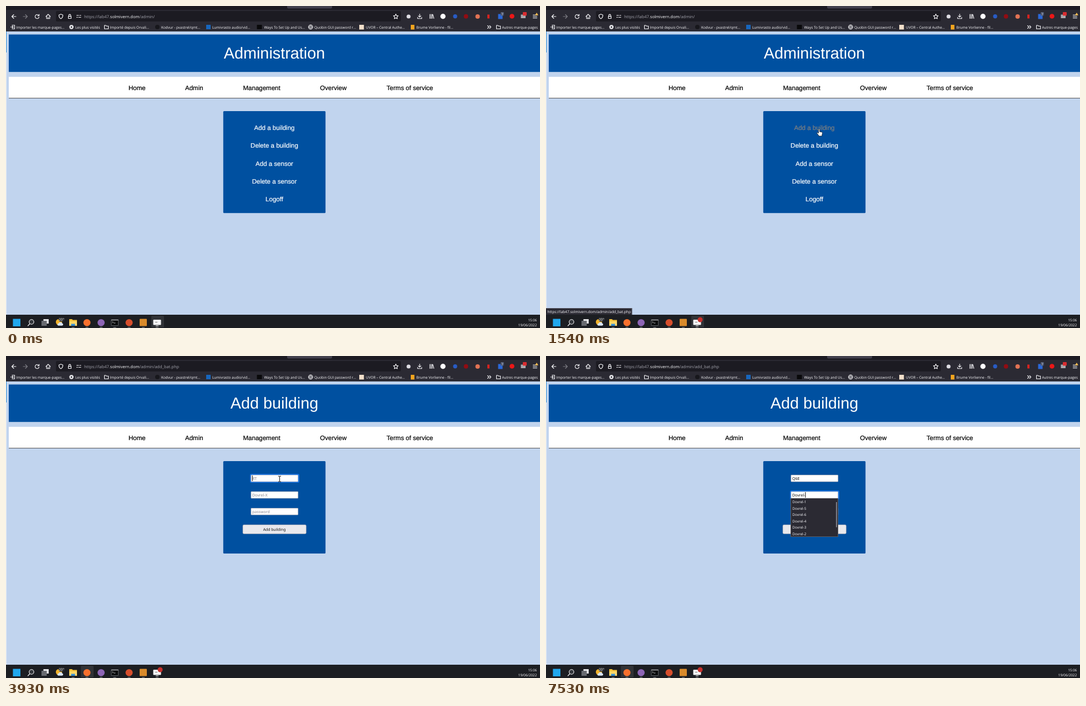
Recreate the animation shown at these times as an HTML page. Size 963 by 582 pixels, loop 8000 ms.

```html
<!DOCTYPE html>
<html lang="en">
<head>
<meta charset="utf-8">
<title>Add building</title>
<style>
html, body { margin: 0; width: 100%; height: 100%; overflow: hidden; background: #c1d4ee; }
svg { display: block; }
text { white-space: pre; text-rendering: geometricPrecision; }
.ui { font-family: "Open Sans", "Noto Sans", sans-serif; font-size: 6.45px; fill: #fbfbfe; }
.page { font-family: "Liberation Sans", Arial, sans-serif; font-size: 11.52px; stroke-width: .2; }
.field { font-family: "Noto Sans", sans-serif; font-size: 7px; fill: #111; }
.mid { text-anchor: middle; }
.line { fill: none; stroke: #fbfbfe; stroke-width: 1.1; stroke-linecap: round; stroke-linejoin: round; }
.dim { opacity: .4; }
.url { font-size: 7.5px; fill: #a3a3ac; }
.hint { fill: #868690; }
</style>
</head>
<body>
<svg width="963" height="582" viewBox="0 0 963 582">
  <!-- browser chrome -->
  <rect width="963" height="46" fill="#2b2a33"/>
  <rect width="963" height="7" fill="#1c1b22"/>
  <rect x="507" y="-4" width="81" height="8.5" rx="2" fill="#42414d"/>
  <rect x="90" y="9" width="622" height="19" rx="2.5" fill="#1c1b22"/>
  <g class="line">
    <path d="M18 19H10.5M14 15.5L10.5 19L14 22.5"/>
    <path class="dim" d="M31 19H38.5M35 15.5L38.5 19L35 22.5"/>
    <path id="reload" d="M59 17A3.6 3.6 0 1 0 59.6 20M59.7 15V17.6H57"/>
    <path id="stop" d="M53 16L59 22M59 16L53 22"/>
    <path d="M72 19L76 15L80 19M73.2 18.5V22.7H78.8V18.5M76 22.5V20"/>
    <path d="M99 14.8L102.6 16.2Q102.6 21 99 23Q95.4 21 95.4 16.2Z"/>
    <path d="M112.5 18.6H117.5V22.5H112.5ZM113.3 18.5V16.8A1.7 1.7 0 0 1 116.7 16.8V18.5"/>
    <path d="M127.5 17H131M133 17H135M127.5 20.5H129M131 20.5H135"/>
    <path d="M703 14.6L704.3 17.4L707.4 17.7L705.1 19.8L705.7 22.9L703 21.4L700.3 22.9L700.9 19.8L698.6 17.7L701.7 17.4Z"/>
    <path d="M746 14.5V20M743.7 17.8L746 20.1L748.3 17.8M742.3 20.6V22.7H749.7V20.6"/>
    <path d="M764.4 15V22.5M766.6 15V22.5M768.7 15V22.5M769.6 15.4L771.6 22.5"/>
    <path d="M950.5 16.3H957.5M950.5 19H957.5M950.5 21.7H957.5"/>
    <path d="M11 35V34.8H15.6V41.2H11V41M8.5 38H13M11.5 36.3L13.2 38L11.5 39.7"/>
    <path d="M177.5 35H180L181 36.2H184.7V41.3H177.5ZM884.5 35H887L888 36.2H891.7V41.3H884.5Z"/>
    <path d="M868.5 35.5L871 38L868.5 40.5M872 35.5L874.5 38L872 40.5"/>
    <circle cx="549.3" cy="38" r="3.8"/>
    <path d="M545.5 38H553M549.3 34.2Q545.8 38 549.3 41.8Q552.8 38 549.3 34.2" stroke-width=".8"/>
    <circle cx="118" cy="38" r="2.4" stroke-width="1.7"/>
    <circle cx="118" cy="38" r="3.7" stroke-width="1" stroke-dasharray=".9 2"/>
  </g>
  <circle cx="726" cy="19" r="3.6" fill="#dedee4"/>
  <circle cx="788" cy="18.7" r="4.7" fill="#fff"/>
  <circle cx="810" cy="18.7" r="3.7" fill="#285bc4"/>
  <circle cx="829.5" cy="18.7" r="4" fill="#900d13"/>
  <circle cx="850.5" cy="19" r="4" fill="#e17354"/>
  <rect x="868" y="15.5" width="4" height="7" fill="#d52220"/>
  <rect x="887.5" y="14.5" width="8" height="9" fill="#2b68d8"/>
  <rect x="892" y="11" width="6" height="6.5" rx="1" fill="#49536a"/>
  <text class="ui mid" x="895" y="16.5" style="font-size:6px">7</text>
  <circle cx="912.5" cy="18.5" r="4.3" fill="#ec1717"/>
  <rect x="928.5" y="15.5" width="8.5" height="6.5" fill="#a9a9ae"/>
  <rect x="932" y="11" width="7" height="6.5" rx="1" fill="#d92d30"/>
  <path d="M957 12L960 16.8H954Z" fill="#ffbd4f"/>
  <text class="ui url" x="141" y="21.7">https://lab47.<tspan fill="#fbfbfe">solmivern.dom</tspan>/admin/<tspan id="leaf"></tspan></text>

  <circle cx="273" cy="38" r="4" fill="#17171c"/>
  <rect x="361" y="34" width="8" height="8" fill="#1766bd"/>
  <rect x="452.5" y="34" width="9" height="8" fill="#09090b"/>
  <rect x="637" y="34" width="8.5" height="8.5" fill="#f2dfca"/>
  <rect x="730" y="34" width="6.5" height="8.5" fill="#f3a51f"/>
  <g class="ui">
    <text x="18.5" y="40.5">Importer les marque-pages...</text>
    <text x="125" y="40.5">Les plus visités</text>
    <text x="187.5" y="40.5">Importé depuis Orvali...</text>
    <text x="280" y="40.5">Kodvur - pvastrel/qmt...</text>
    <text x="372" y="40.5">Lumivrasto audio/vid...</text>
    <text x="465.5" y="40.5">Ways To Set Up and Us...</text>
    <text x="556" y="40.5">Quobin GUI password r...</text>
    <text x="649" y="40.5">UVOR – Central Authe...</text>
    <text x="740" y="40.5">Brume Vorlienne - fil...</text>
    <text x="894.5" y="40.5">Autres marque-pages</text>
  </g>

  <!-- web page -->
  <rect y="46" width="1" height="512" fill="#e4ebf5"/>
  <rect y="46" width="1" height="38" fill="#2f8fda"/>
  <rect x="5" y="51.5" width="958" height="67.7" fill="#0050a0"/>
  <rect x="5" y="128" width="958" height="38" fill="#fff"/>
  <rect x="5" y="166" width="958" height="1" fill="#555"/>
  <text id="title" class="page mid" x="484" y="95" fill="#fff" style="font-size:28.8px"></text>
  <g class="page" stroke="#000">
    <text x="221" y="152">Home</text>
    <text x="323" y="152">Admin</text>
    <text x="427.5" y="152">Management</text>
    <text x="566.3" y="152">Overview</text>
    <text x="686.3" y="152">Terms of service</text>
  </g>
  <rect id="panel" x="391.8" y="190" width="184.4" rx="1.5" fill="#0050a0"/>
  <g id="menu" class="page mid"></g>
  <g id="form">
    <rect id="glow" x="441" width="87" height="14" rx="1.5" fill="none" stroke="#1273e6" stroke-width="2"/>
    <g fill="#fff" stroke="#8f8f9d" stroke-width=".6">
      <rect x="441.8" y="215" width="85" height="12.2" rx=".8"/>
      <rect x="441.8" y="245" width="85" height="12.2" rx=".8"/>
      <rect x="441.8" y="275" width="85" height="12.2" rx=".8"/>
      <rect x="427" y="305" width="114.4" height="16.4" rx="2" fill="#e9e9ed"/>
    </g>
    <text id="name" class="field" x="444" y="223.8"></text>
    <text id="owner" class="field" x="444" y="253.8"></text>
    <text class="field hint" x="444" y="283.8">password</text>
    <text class="field mid" x="484" y="315.8" style="font-size:6.8px">Add building</text>
    <rect id="caret" width="1" height="10" fill="#111"/>
    <g id="nameList">
      <rect x="441.5" y="227.5" width="85" height="12" fill="#25252b" stroke="#59595c"/>
      <text class="ui" x="444.3" y="235.8">Q6E</text>
    </g>
    <g id="ownerList">
      <rect x="441.5" y="257.5" width="85" height="69" fill="#2b2a33" stroke="#5c5b60"/>
      <rect x="523" y="264" width="1.6" height="45.5" fill="#92929a"/>
    </g>
  </g>
  <g id="status">
    <rect id="statusBox" x="-.5" y="546.5" height="12" fill="#2b2a33" stroke="#55545e"/>
    <text id="statusText" class="ui" x="2.5" y="555.3" style="font-size:6.6px"></text>
  </g>

  <!-- taskbar -->
  <rect y="558" width="963" height="24" fill="#1c1e22"/>
  <rect id="active" y="560" width="23" height="21" rx="1.5" fill="#303236"/>
  <rect x="12.5" y="565.5" width="13.5" height="13.5" fill="#20a8ee"/>
  <g class="line" stroke-width="1.4">
    <circle cx="46" cy="571" r="4.2" fill="#33363a"/>
    <path d="M42.8 574.5L39.5 578"/>
  </g>
  <rect x="67.5" y="566" width="9.5" height="8" fill="#e7e7e9"/>
  <rect x="64" y="569" width="9.5" height="9" fill="#696b70"/>
  <circle cx="95.5" cy="571.3" r="5.6" fill="#f5b52e"/>
  <path d="M94 577.7A2.3 2.3 0 0 1 95 573.4A3.5 3.5 0 0 1 101.4 573.6A2.1 2.1 0 0 1 101.5 577.7Z" fill="#d9e5f5"/>
  <rect x="95" y="563" width="11" height="7.5" rx="3.7" fill="#292b2e"/>
  <text class="ui mid" x="100" y="569.3">20°</text>
  <path d="M114 566H119L120.5 567.5H128V578H114Z" fill="#f8c33c"/>
  <path d="M114 570H128V578H114Z" fill="#fbd768"/>
  <rect x="117.5" y="574.5" width="7" height="3.5" fill="#338ed8"/>
  <circle cx="146" cy="572.3" r="6.4" fill="#f9702c"/>
  <circle cx="171.5" cy="572.3" r="6.4" fill="#8d65b5"/>
  <rect x="190" y="567" width="12.5" height="10.5" fill="#08090a" stroke="#7b7c80" stroke-width=".7"/>
  <path d="M190 567.7H202.5" stroke="#cfcfd2"/>
  <path d="M192 570.5L193.5 571.5L192 572.5M194.5 573H197" class="line" style="stroke-width:.7"/>
  <circle cx="222" cy="572.3" r="6.4" fill="#d64e2c"/>
  <rect x="241" y="565.5" width="13" height="13" rx="1" fill="#d98b2b"/>
  <path d="M266 567.5H279V576H266ZM270 578H275" fill="#f4f4f5" stroke="#f4f4f5"/>
  <path d="M269 571.5H273" stroke="#777"/>
  <path d="M118.5 581H123.5M143.5 581H148.5M169 581H174M193.5 581H198.5M219.5 581H224.5M245 581H250M270 581H275" stroke="#8b8d91"/>
  <circle id="dot" cx="278" cy="567" r="4.5" fill="#c5302c"/>
  <text class="ui" x="957.3" y="570" text-anchor="end" style="font-size:6.2px">15:06</text>
  <text class="ui" x="957.3" y="579" text-anchor="end" style="font-size:6.3px">19/06/2022</text>

  <!-- pointers, hot spot at 0,0 -->
  <path id="arrow" d="M0 0V11L2.6 8.6L4.3 12.4L6 11.7L4.3 8H7.8Z" fill="#fff" stroke="#111" stroke-width=".7"/>
  <path id="hand" d="M-1 1Q0 -.6 1 1V5.2L5 6Q6.2 6.4 6 8L5.2 11.2V13H-1V11.5L-4 7.8Q-3.8 6 -2.2 7L-1 8Z" fill="#fff" stroke="#111" stroke-width=".7"/>
  <path id="beam" d="M-2.5 -5H-.5L0 -4.5L.5 -5H2.5M0 -4.5V4.5M-2.5 5H-.5L0 4.5L.5 5H2.5" fill="none" stroke="#111"/>
</svg>
<script>
const $ = id => document.getElementById(id);
const show = (id, on) => $(id).style.display = on ? "" : "none";
const set = (id, attrs) => { for (const k in attrs) $(id).setAttribute(k, attrs[k]); };
const put = (id, s) => { if ($(id).textContent !== s) $(id).textContent = s; };
const within = (t, a, b) => t >= a && t < b;

function addText(parent, x, y, s, cls) {
  const el = document.createElementNS("http://www.w3.org/2000/svg", "text");
  el.setAttribute("x", x);
  el.setAttribute("y", y);
  el.setAttribute("class", cls);
  el.textContent = s;
  return $(parent).appendChild(el);
}

const links = ["Add a building", "Delete a building", "Add a sensor", "Delete a sensor", "Logoff"]
  .map((s, i) => addText("menu", 484, 224 + i * 32.25, s, ""));
[1, 5, 6, 4, 3, 2].forEach((n, i) => addText("ownerList", 444.3, 266 + i * 11.55, "Dovrel-" + n, "ui"));

const LOOP = 8000, LOADED = 2250, FOCUS = 2900, NEXT = 5870;
const nameKeys = [4490, 4980, 5340];
const ownerKeys = [6410, 6540, 6700, 6900, 7170, 7300, 7500];
// time, x, y of the pointer
const path = [[580, 512, 3], [700, 508, 25], [900, 500, 150], [1150, 494, 251.5], [1370, 492.5, 224], [1540, 492.5, 222]];

function pointer(t) {
  const i = path.findIndex(p => p[0] > t);
  if (i < 0) return path.at(-1).slice(1);
  const [t0, x0, y0] = path[Math.max(0, i - 1)], [t1, x1, y1] = path[i];
  const k = t1 > t0 ? (t - t0) / (t1 - t0) : 0;
  return [x0 + (x1 - x0) * k, y0 + (y1 - y0) * k];
}

function typed(id, s, keys, hint, t) {
  const n = keys.filter(k => t >= k).length;
  put(id, n ? s.slice(0, n) : hint);
  $(id).classList.toggle("hint", !n);
  return n ? $(id).getComputedTextLength() : 0;
}

function drawPointer(t, loaded) {
  const [x, y] = t < 2410 ? pointer(t) : [493.5, 222.3];
  const row = loaded || t < 580 ? -1 : [220, 252].findIndex(c => Math.abs(y - c) < 6.8);
  links.forEach((el, i) => {
    const color = i === row ? "#808080" : "#fff";
    el.setAttribute("fill", color);
    el.setAttribute("stroke", color);
  });
  show("status", row >= 0);
  if (row >= 0) {
    put("statusText", "https://lab47.solmivern.dom/admin/" + ["add", "del"][row] + "_bat.php");
    set("statusBox", { width: $("statusText").getComputedTextLength() + 5 });
  }
  const beam = t >= 2410, hand = !beam && (row >= 0 || loaded);
  show("beam", beam && t < 4980);
  show("hand", hand);
  show("arrow", !beam && !hand && t >= 580);
  for (const id of ["beam", "hand", "arrow"]) set(id, { transform: `translate(${x} ${y})` });
}

function drawForm(t) {
  const second = t >= NEXT;
  const nameWidth = typed("name", "Q6E", nameKeys, "RT", t);
  const ownerWidth = typed("owner", "Dovrel-", ownerKeys, "Dovrel-X", t);
  show("glow", t >= FOCUS);
  set("glow", { y: second ? 244 : 214 });
  show("caret", within(t, FOCUS, 3400) || within(t, 3930, 5540) || second);
  set("caret", { x: 443.8 + (second ? ownerWidth : nameWidth), y: second ? 246 : 216 });
  show("nameList", within(t, 4560, NEXT));
  show("ownerList", t >= 6480);
}

function draw(t) {
  const loaded = t >= LOADED, loading = within(t, 1990, 2350);
  put("title", loaded ? "Add building" : "Administration");
  put("leaf", loaded ? "add_bat.php" : "");
  set("panel", { height: loaded ? 167 : 184.2 });
  show("menu", !loaded);
  show("form", loaded);
  show("stop", loading);
  show("reload", !loading);
  $("reload").classList.toggle("dim", within(t, 2350, 2950));
  set("active", { x: t < 1970 ? 262 : 135 });
  set("dot", { opacity: Math.min(1, Math.max(0, (t - 15) / 315)) });
  drawPointer(t, loaded);
  if (loaded) drawForm(t);
}

const start = performance.now();
function tick() {
  draw((performance.now() - start) % LOOP);
  requestAnimationFrame(tick);
}
tick();
</script>
</body>
</html>
```
